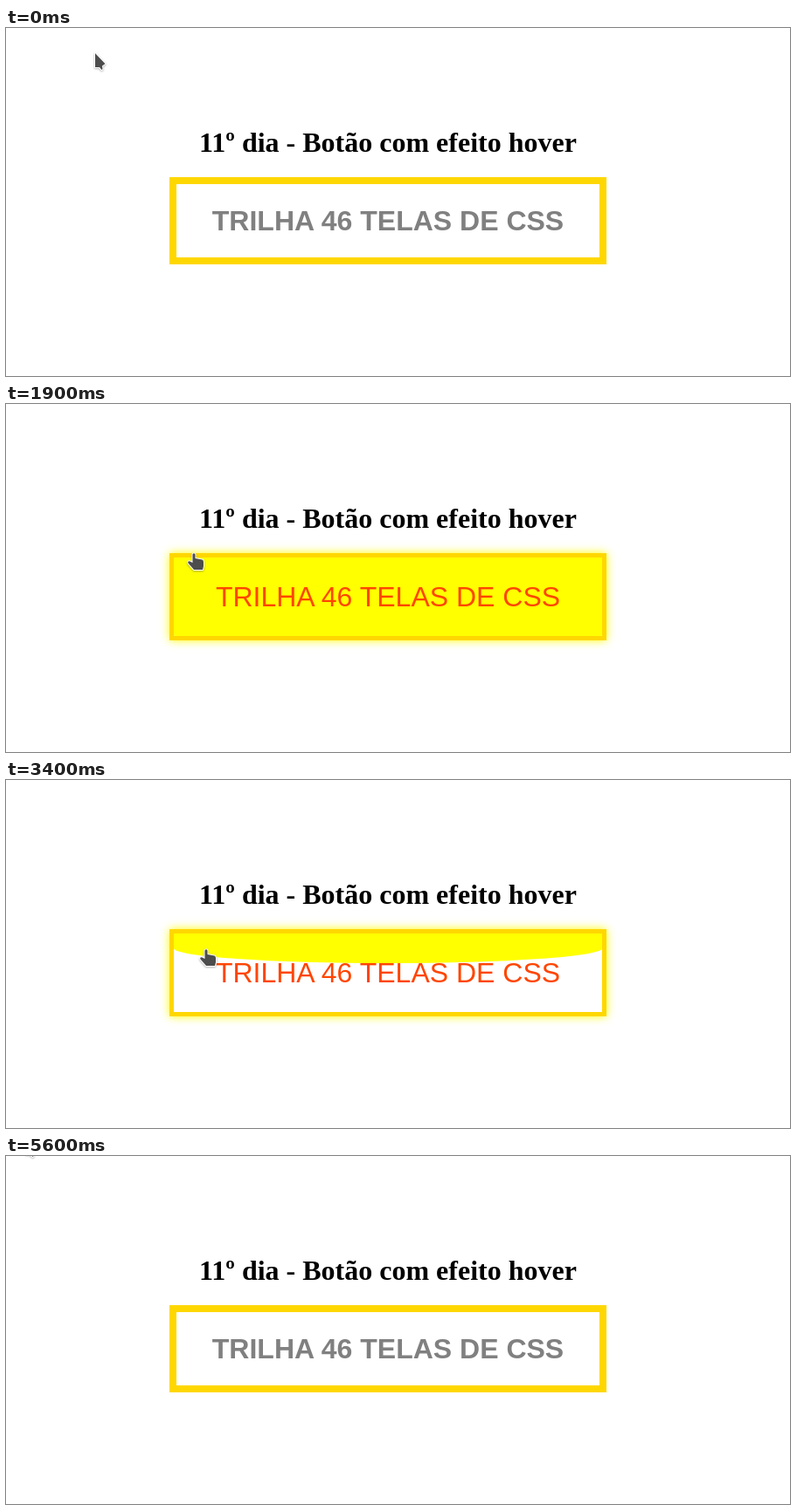
Animation of 897 by 399 pixels, one loop 5900 ms. Source, as an HTML page:

```html
<!DOCTYPE html>
<html lang="pt">
<head>
<meta charset="utf-8">
<title>Botão com efeito hover</title>
<style>
  html, body { margin: 0; width: 100%; height: 100%; overflow: hidden; background: #fff; }
  h1, #label {
    position: absolute; left: 0; width: 874px; margin: 0;
    font-size: 32px; line-height: 36px; font-weight: bold; text-align: center;
  }
  h1 { top: 113px; font-family: "Liberation Serif", serif; color: #000; }
  #label { top: 203px; font-family: "Liberation Sans", sans-serif; color: #808080; }
  #button {
    position: absolute; left: 187px; top: 171px; width: 500px; height: 100px;
    box-sizing: border-box; border: 8px solid #ffd700; overflow: hidden;
  }
  #fill { width: 100%; background: #ff0; border-radius: 0 0 50% 50%; }
  svg { position: absolute; left: 0; top: 0; }
  #cursor { filter: drop-shadow(0 1px 1px rgba(0, 0, 0, .3)); }
  #cursor path { fill: #4d4d4d; stroke: #fff; stroke-width: 2; stroke-linejoin: round; paint-order: stroke; }
  #hand { display: none; }

  .hover #button { border-width: 5px; box-shadow: 0 0 10px #ff0; }
  .hover #label { font-weight: normal; color: #ff4500; }
  .hover #arrow { display: none; }
  .hover #hand { display: inline; }
</style>
</head>
<body>
<h1>11º dia - Botão com efeito hover</h1>
<div id="button"><div id="fill"></div></div>
<div id="label">TRILHA 46 TELAS DE CSS</div>
<svg width="897" height="399">
  <g id="cursor">
    <path id="arrow" d="M0 0V16H3.5L5 16L7.5 19L8.5 18L8 14.5L11.5 12Z"/>
    <path id="hand" d="M-1.5 1.5Q0 -1 1.5 1.5V6L9.5 7.5Q11 8 11 10V15L10 19H0L-6.5 11.5Q-7.5 9 -5 9.2L-1.5 11Z"/>
  </g>
</svg>
<script>
const LOOP = 5900, STEP = 100, TRANSITION = 800, FULL_HEIGHT = 190;
const fill = document.getElementById('fill');
const cursor = document.getElementById('cursor');

const easeIn = u => u * u;
const easeOut = u => 1 - (1 - u) ** 2;
const easeOutFast = u => 1 - (1 - u) ** 3;
const easeInOut = u => u * u * (3 - 2 * u);

const home = { x: 102, y: 29 };
const moves = [
  { start: 100, end: 900, x: 314, y: 234, ease: easeOutFast },
  { start: 1400, end: 2400, x: 115, y: 108, ease: easeInOut },
  { start: 2600, end: 3400, x: 229, y: 194, ease: easeIn },
  { start: 3400, end: 3900, x: 314, y: 240, ease: easeOut },
  { start: 4400, end: 4900, x: 126, y: 107, ease: easeInOut },
  { start: 5000, end: 5600, x: 23, y: -18, ease: easeIn }
];
const hovers = [{ enter: 330, leave: 1971 }, { enter: 3275, leave: 4687 }];
// The picture stalls briefly while the fill is retreating.
const stalls = [{ start: 2400, end: 2700 }, { start: 4900, end: 5100 }];

const progress = (t, start, end) => Math.min(1, Math.max(0, (t - start) / (end - start)));

// CSS "ease": cubic-bezier(.25, .1, .25, 1), solved by bisection
function cssEase(x) {
  let low = 0, high = 1, s;
  for (let i = 0; i < 20; i++) {
    s = (low + high) / 2;
    if (.75 * s * (1 - s) + s ** 3 < x) low = s; else high = s;
  }
  return .3 * s * (1 - s) ** 2 + 3 * s * s * (1 - s) + s ** 3;
}

function sampleTime(ms) {
  const t = Math.floor(ms / STEP) * STEP;
  const stall = stalls.find(({ start, end }) => t >= start && t < end);
  return stall ? stall.start : t;
}

function pointerAt(t) {
  let { x, y } = home;
  for (const move of moves) {
    const k = move.ease(progress(t, move.start, move.end));
    x += (move.x - x) * k;
    y += (move.y - y) * k;
  }
  return [Math.round(x), Math.round(y)];
}

function fillAt(t) {
  return hovers.reduce((sum, { enter, leave }) => sum
    + cssEase(progress(t, enter, enter + TRANSITION))
    - cssEase(progress(t, leave, leave + TRANSITION)), 0);
}

function draw(now) {
  const t = sampleTime(now % LOOP);
  const hovered = hovers.some(({ enter, leave }) => t >= enter && t < leave);
  document.body.classList.toggle('hover', hovered);
  fill.style.height = Math.max(0, fillAt(t)) * FULL_HEIGHT + '%';
  cursor.setAttribute('transform', `translate(${pointerAt(t)})`);
}

const began = performance.now();
function tick() {
  draw(performance.now() - began);
  requestAnimationFrame(tick);
}
tick();
</script>
</body>
</html>
```
